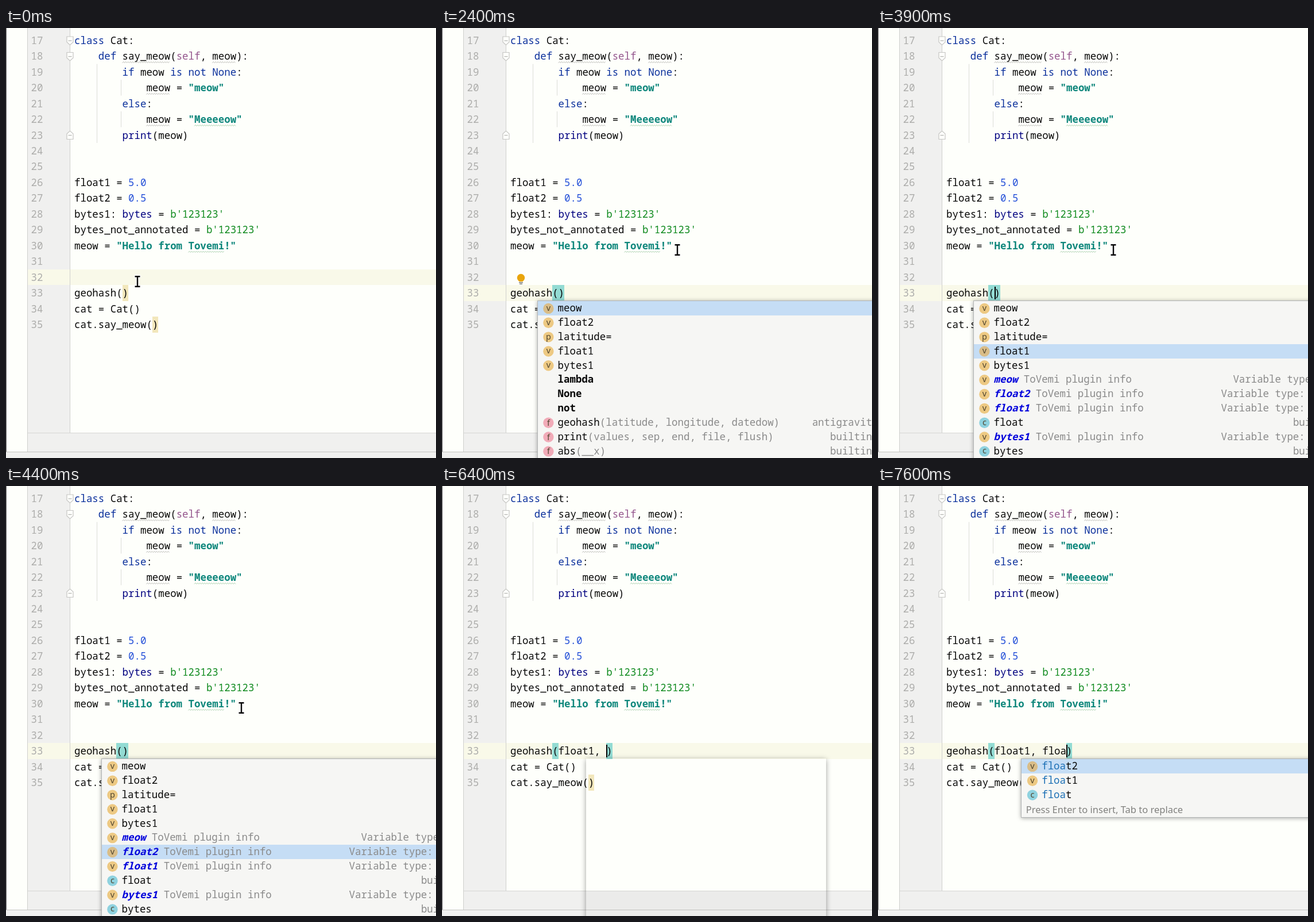
Write an HTML page with a canvas that moves like this. It is 749 px wide and 748 px high and loops after 8000 ms.

```html
<!DOCTYPE html>
<html lang="en">
<head>
<meta charset="utf-8">
<title>Code completion</title>
<style>
  html, body { margin: 0; width: 100%; height: 100%; overflow: hidden; background: #fefffb; }
  canvas { display: block; }
</style>
</head>
<body>
<canvas id="stage" width="749" height="748"></canvas>
<script>
const ctx = document.getElementById('stage').getContext('2d');
const W = 749, H = 748, LOOP = 8000;
const SIZE = 17.42, CW = 10.45, LINE = 27.47, TOP = 7.7, LEFT = 119;
const ROW = 24.85, LIST_TOP = 475;
const MONO = '"Noto Sans Mono", "DejaVu Sans Mono", monospace';
const SANS = '"Noto Sans", "Open Sans", sans-serif';
const PAPER = '#fefffb', GUTTER = '#f0f0ef', EDGE = '#cfcfcd';
const INK = '#080808', GREY = '#8a8a8a', TEAL = '#93dbd3', TAN = '#f2e7bb';

const code = [
  'class Cat:',
  '    def say_meow(self, meow):',
  '        if meow is not None:',
  '            meow = "meow"',
  '        else:',
  '            meow = "Meeeeow"',
  '        print(meow)',
  '', '',
  'float1 = 5.0',
  'float2 = 0.5',
  "bytes1: bytes = b'123123'",
  "bytes_not_annotated = b'123123'",
  'meow = "Hello from Tovemi!"',
  '', '',
  'geohash()',
  'cat = Cat()',
  'cat.say_meow()'
];
const CALL = 16;

// Token rules, tried in order
const syntax = [
  [/^"[^"]*"/, '#0f877c', 'bold'],
  [/^b'[^']*'/, '#0f8a1e'],
  [/^(class|def|if|is|not|None|else)\b/, '#0b309c'],
  [/^self\b/, '#94558d'],
  [/^(print|bytes)\b/, '#000080'],
  [/^\d\.\d/, '#2450d8'],
  [/^(\w+|\s+|.)/, INK]
];

// Line, first column, length, colour
const waves = [
  [1, 8, 8, '#b9b9b5'], [1, 23, 4, '#b9b9b5'], [3, 12, 4, '#b9b9b5'],
  [5, 12, 4, '#b9b9b5'], [5, 20, 7, '#a5cdaa'], [13, 19, 6, '#a5cdaa']
];

// Completion items: icon, name, hint, right label
const vars = param => [
  ['v', 'meow'], ['v', 'float2'], ['p', param + '='], ['v', 'float1'], ['v', 'bytes1']
];
const info = (name, type) => ['V', name, ' ToVemi plugin info', 'Variable type: ' + type];
const fn = (name, args, from = 'builtins') => ['f', name, `(${args})`, from];
const cls = name => ['c', name, '', 'builtins'];
const plain = [
  ['k', 'lambda'], ['k', 'None'], ['k', 'not'],
  fn('geohash', 'latitude, longitude, datedow', 'antigravity'),
  fn('print', 'values, sep, end, file, flush'), fn('abs', '__x')
];
const extra = [
  info('meow', 'str'), info('float2', 'float'), info('float1', 'float'),
  cls('float'), info('bytes1', 'bytes'), cls('bytes')
];
const floats = [['v', 'float2'], ['v', 'float1'], cls('float')];
const lists = {
  first: { items: [...vars('latitude'), ...plain], right: 759.6 },
  full: { items: [...vars('latitude'), ...extra], right: 806.5 },
  second: { items: [...vars('longitude'), ...extra], right: 890 },
  f: {
    items: [...floats, info('float2', 'float'), info('float1', 'float'),
      fn('filter', 'function, iterable'), fn('format', 'value, format_spec'),
      cls('frozenset'), ['k', 'False'], cls('FloatingPointError'), cls('OverflowError')],
    right: 890
  },
  flo: { items: [...floats, cls('FloatingPointError'), cls('OverflowError')], right: 890 },
  floa: { items: floats, right: 890 }
};

// Timelines: [start, value]
const args = [[0, ''], [5000, 'float1'], [5700, 'float1,'], [5800, 'float1, '],
  [6900, 'float1, f'], [7100, 'float1, fl'], [7200, 'float1, flo'], [7500, 'float1, floa']];
const popups = [[0, ''], [2400, 'first'], [2800, 'full'], [5000, ''], [6400, 'shell'],
  [6500, 'second'], [7000, 'f'], [7300, 'flo'], [7600, 'floa']];
const picks = [[0, 0], [3700, 1], [3800, 2], [3900, 3], [4000, 4], [4100, 5],
  [4300, 6], [4600, 8], [4900, 7], [5000, 0]];
const carets = [[0, 0], [900, 1], [1700, 0], [2900, 1], [3400, 0], [3700, 1],
  [4400, 0], [4900, 1], [6500, 0], [6900, 1]];
const at = (steps, t) => steps.filter(s => s[0] <= t).pop()[1];

const colX = col => LEFT + col * CW;
const lineY = line => TOP + line * LINE;

function rect(x, y, w, h, color) {
  ctx.fillStyle = color;
  ctx.fillRect(x, y, w, h);
}

function text(str, x, y, color, style = '', family = MONO, size = SIZE) {
  ctx.font = `${style} ${size}px ${family}`;
  ctx.fillStyle = color;
  ctx.fillText(str, x, y);
}

function mark(line, col, color, n = 1) {
  const x = Math.round(colX(col)), y = Math.round(lineY(line));
  rect(x, y, Math.round(colX(col + n)) - x, Math.round(lineY(line + 1)) - y, color);
}

function codeLine(str, line) {
  let col = 0;
  while (col < str.length) {
    const rest = str.slice(col);
    const [rule, color, style] = syntax.find(s => s[0].test(rest));
    const token = rest.match(rule)[0];
    text(token, colX(col), lineY(line) + 20, color, style);
    col += token.length;
  }
}

function wave([line, col, len, color]) {
  const x0 = colX(col), y = lineY(line) + 24.5;
  ctx.beginPath();
  for (let x = 0; x <= len * CW; x += 2) ctx.lineTo(x0 + x, y + (x % 4 ? -1 : 1));
  ctx.strokeStyle = color;
  ctx.lineWidth = 1;
  ctx.stroke();
}

function fold(y, dir) {
  ctx.beginPath();
  [[-5.5, -7], [5.5, -7], [5.5, 2.5], [0, 7.5], [-5.5, 2.5]]
    .forEach(([x, dy]) => ctx.lineTo(111.5 + x, y + dy * dir));
  ctx.closePath();
  ctx.fillStyle = PAPER;
  ctx.fill();
  ctx.strokeStyle = '#c6c6c4';
  ctx.lineWidth = 1.2;
  ctx.stroke();
  rect(108.5, y - 0.5, 6, 1.2, '#b4b4b2');
}

function frame(line) {
  rect(0, 0, W, H, PAPER);
  rect(38, 0, 73, 704, GUTTER);
  rect(38, 704, W - 38, 33, GUTTER);
  rect(0, 738, W, 10, '#f1f1f0');
  const y = Math.round(lineY(line));
  rect(38, y, W - 38, Math.round(lineY(line + 1)) - y, '#f9f9e9');
  rect(37, 0, 1, 737, EDGE);
  rect(111, 0, 1, 704, EDGE);
  rect(38, 704, W - 38, 1, '#d6d6d4');
  rect(0, 737, W, 1, '#c4c4c2');
  rect(0, 0, 1, 737, '#6e6e6e');
  rect(158, lineY(2), 1, LINE * 5, '#dcdcd9');
  for (const i of [3, 5]) rect(200, lineY(i), 1, LINE, '#dcdcd9');
  fold(22, 1);
  fold(49.5, 1);
  fold(186.5, -1);
}

function editor(t) {
  const typed = at(args, t);
  frame(t < 700 ? 15 : CALL);
  mark(18, 13, TAN);
  if (t < 1000) mark(CALL, 8, TAN);
  else {
    mark(CALL, 7, TEAL);
    mark(CALL, 8 + typed.length, TEAL);
  }
  if (t >= 5100 && t < 5700) {
    mark(9, 0, '#fce8f4', 6);
    mark(CALL, 8, '#edebfc', 6);
  }
  code.forEach((str, i) => {
    text(String(17 + i), 43.5, lineY(i) + 20, '#adadab');
    codeLine(i === CALL ? `geohash(${typed})` : str, i);
  });
  waves.forEach(wave);
  if (at(carets, t)) rect(Math.round(colX(8 + typed.length)), 450, 2, 22, '#000');
}

function bulb() {
  ctx.beginPath();
  ctx.arc(137.5, 434.5, 6.7, 0, 7);
  ctx.fillStyle = '#e9a50c';
  ctx.fill();
  rect(134, 438, 7, 3, '#e9a50c');
  rect(134, 442, 7, 1.3, '#6c6c66');
  rect(135, 444.5, 5, 1.3, '#6c6c66');
}

// Empty window: only its outer shadow shows
function shell() {
  ctx.save();
  ctx.beginPath();
  ctx.rect(0, 0, W, H);
  ctx.rect(251, 474, 418, 300);
  ctx.clip('evenodd');
  ctx.shadowColor = 'rgba(0,0,0,.38)';
  ctx.shadowBlur = 9;
  ctx.shadowOffsetY = 2;
  rect(251, 474, 418, 300, '#d4d4d2');
  ctx.restore();
  rect(251, 705, 418, 43, 'rgba(0,0,0,.02)');
}

function icon(kind, x, y, picked) {
  const tones = { v: '#edc983', p: '#edc983', f: '#f1abb8', c: '#8fd2df' };
  const key = kind.toLowerCase();
  if (!tones[key]) return;
  ctx.beginPath();
  ctx.arc(x, y, 9.2, 0, 7);
  ctx.fillStyle = picked ? '#d9bd88' : tones[key];
  ctx.fill();
  ctx.textAlign = 'center';
  text(key, x, y + (key === 'f' ? 5 : 4), '#51462f', '', SANS, 14.5);
  ctx.textAlign = 'left';
}

function popup(name, t) {
  const { items, right } = lists[name];
  const late = t > 6000;
  const x = colX(late ? 16 : 8) - 36, left = Math.round(x);
  const prefix = late ? name.replace('second', '') : '';
  const footer = items.length < 11;
  const end = LIST_TOP + items.length * ROW;
  const bottom = footer ? Math.round(end + 27) : H + 20;
  const picked = at(picks, t);

  ctx.save();
  ctx.shadowColor = 'rgba(0,0,0,.35)';
  ctx.shadowBlur = 7;
  ctx.shadowOffsetY = 1;
  rect(left - 1, 474, W, bottom - 474, '#b2b4b5');
  ctx.restore();
  rect(left, LIST_TOP, W, bottom - LIST_TOP - 1, '#f6f6f4');
  items.forEach(([kind, label, hint = '', side = ''], i) => {
    const y = LIST_TOP + i * ROW, base = y + 18.2, tx = x + 35;
    if (i === picked) rect(left, Math.round(y), W, 25, '#c5ddf5');
    icon(kind, x + 18.8, y + 12.9, i === picked);
    const special = kind === 'V';
    const style = special ? 'italic bold' : kind === 'k' ? 'bold' : '';
    const hit = label.startsWith(prefix) ? prefix.length : 0;
    text(label.slice(0, hit), tx, base, '#1b6fb5', style);
    text(label.slice(hit), tx + hit * CW, base, special ? '#0505dc' : INK, style);
    text(hint, tx + label.length * CW, base, GREY);
    if (side) text(side, right - side.length * CW, base, GREY);
  });
  if (footer) text('Press Enter to insert, Tab to replace', x + 7.5, end + 19, '#80807e', '', SANS, 16.5);
}

function mouseAt(t) {
  if (t < 1000) {
    const k = Math.min(t / 700, 1), e = k * k * (3 - 2 * k);
    return [229 - 31.5 * e, 441 + 20 * e];
  }
  return t < 1100 ? [320, 419] : t < 1300 ? [408, 387] : [410, 386];
}

function mouse(t) {
  const [x, y] = mouseAt(t);
  ctx.lineJoin = ctx.lineCap = 'square';
  ctx.lineCap = 'butt';
  const beam = grow => {
    rect(x - 4.5 - grow, y - 10 - grow, 9 + 2 * grow, 2.5 + 2 * grow, ctx.fillStyle);
    rect(x - 4.5 - grow, y + 7.5 - grow, 9 + 2 * grow, 2.5 + 2 * grow, ctx.fillStyle);
    rect(x - 1.2 - grow, y - 9, 2.4 + 2 * grow, 18, ctx.fillStyle);
  };
  ctx.fillStyle = '#fff';
  beam(1.2);
  ctx.fillStyle = '#0a0a0a';
  beam(0);
}

function draw(now) {
  const t = Math.floor(now % LOOP / 100) * 100;
  const name = at(popups, t);
  editor(t);
  if (t >= 2400 && t < 3700) bulb();
  if (name === 'shell') shell();
  else if (name) popup(name, t);
  if (t < 5700) mouse(t);
}

const start = performance.now();
function tick() {
  draw(performance.now() - start);
  requestAnimationFrame(tick);
}
tick();
</script>
</body>
</html>
```
